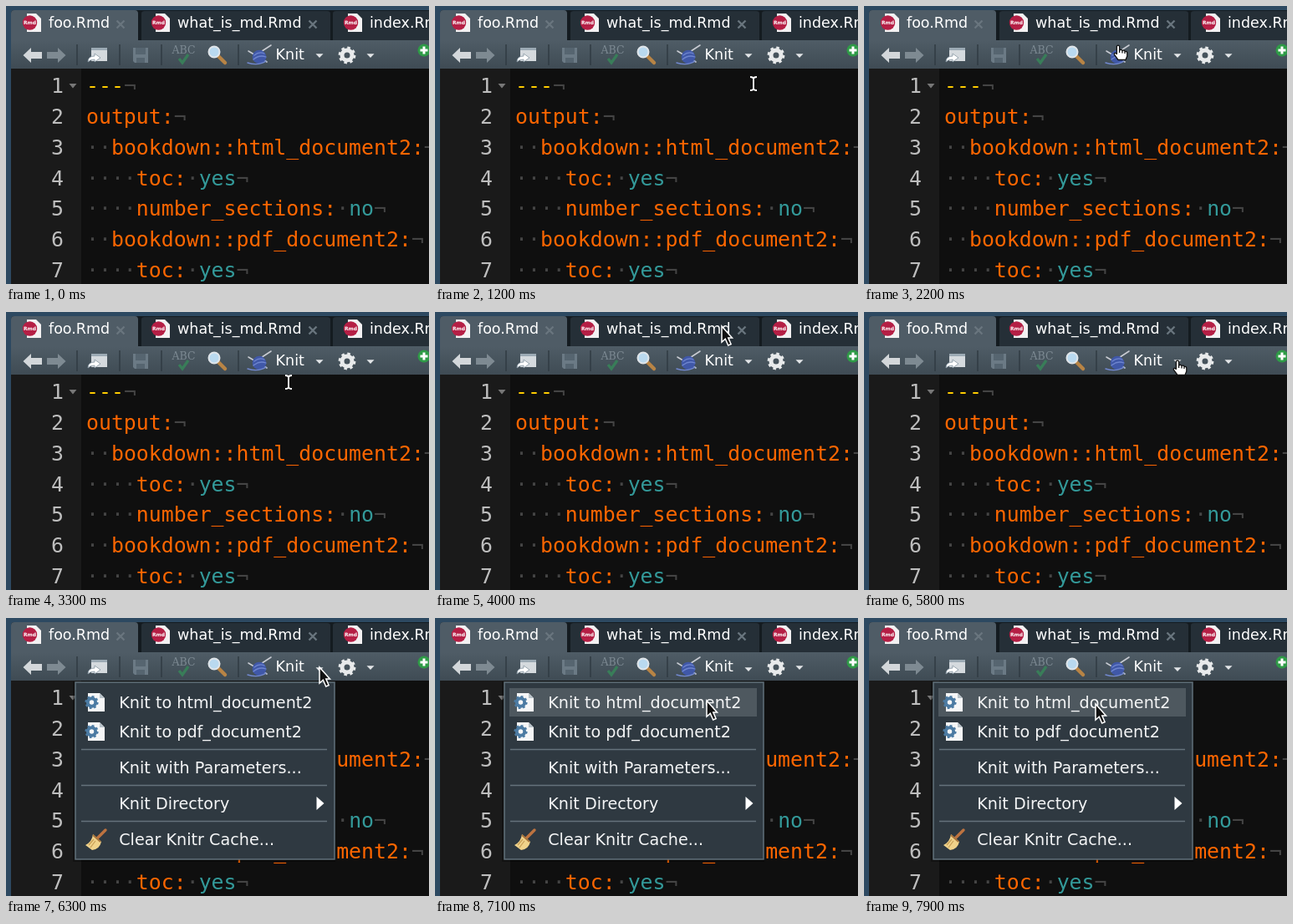
Write an HTML page that moves like this. It is 506 px wide and 333 px high and loops after 8000 ms.

```html
<!DOCTYPE html>
<html lang="en">
<head>
<meta charset="utf-8">
<title>Knit menu</title>
<style>
  html, body { margin: 0; width: 100%; height: 100%; overflow: hidden; background: #0f0f0f; }
  svg { display: block; width: 506px; height: 333px; }
  text { white-space: pre; }
  .ui { font: 17.5px "DejaVu Sans", sans-serif; fill: #fff; }
  .menu { font: 19.2px "DejaVu Sans", sans-serif; fill: #f4f5f6; }
  .code { font: 24.85px "DejaVu Sans Mono", monospace; }
  .key { fill: #f60; }
  .value { fill: #399; }
  .rule { fill: #fc0; }
  .dim { fill: #444; }
  .number { fill: #bebebe; text-anchor: end; }
</style>
</head>
<body>
<svg viewBox="0 0 506 333">
  <defs>
    <linearGradient id="bar" x2="0" y2="1">
      <stop stop-color="#4f5c66"/><stop offset="1" stop-color="#3f4b54"/>
    </linearGradient>
    <g id="file">
      <path d="M-6-11H5L11-5V11H-6Z" fill="#f3f1f2"/>
      <circle cx="-2.500" r="8.700" fill="#b51f45"/>
      <text x="-2.500" y="2.200" text-anchor="middle" font-family="DejaVu Sans, sans-serif" font-weight="bold" font-size="6" fill="#fff">Rmd</text>
    </g>
    <path id="close" d="M-4.500-4.500 4.500 4.500M4.500-4.500-4.500 4.500" stroke="#69757e" stroke-width="2.4"/>
    <path id="back" d="M-11.500 0-2-9V-4H11V4H-2V9Z"/>
    <path id="caret" d="M-4.500-2.300H4.500L0 2.500Z" fill="#e2e5e7"/>
    <g id="gear">
      <circle r="6" fill="none" stroke-width="5"/>
      <circle r="8.700" fill="none" stroke-width="3.400" stroke-dasharray="3.400 3.433"/>
    </g>
    <g id="page">
      <path d="M-8-11H6L12-5V11H-8Z" fill="#f5f6f7"/>
      <path d="M6-11V-5H12Z" fill="#b9c3ca"/>
      <use href="#gear" transform="translate(-3.500 0) scale(.78)" stroke="#4c7ba3"/>
    </g>
    <path id="arrow" d="M0 .9V20L4.300 16.200 7.700 24 11.100 22.500 7.800 14.900H12.500Z" fill="#111" stroke="#fff" stroke-width="1.5"/>
    <g id="beam" fill="none">
      <path id="beamLine" d="M-4-8Q0-8 0-5.500Q0-8 4-8M0-6V6M-4 8Q0 8 0 5.500Q0 8 4 8" stroke-width="1.8" stroke="#fff"/>
    </g>
    <g id="hand" stroke="#111" stroke-width="1.3" stroke-linejoin="round">
      <path d="M-1.600 9V1.200Q0-1 1.600 1.200V6Q4 4.600 5 6.400Q7.300 5.400 8 7.400Q10.800 6.800 10.800 9.400V13L9 17.500H0L-4.800 10.800Q-4.600 8-1.600 10.400Z" fill="#fff"/>
      <path d="M5 6.600V9.500M8 7.600V10M1.600 6V9" fill="none"/>
    </g>
  </defs>

  <rect width="506" height="333" fill="#2d4961"/>
  <path d="M6 333V9Q6 5 10 5H506V333Z" fill="#141b20"/>
  <path d="M6 43V9Q6 5 10 5H154Q158 5 158 9V43Z" fill="#4f5c66"/>
  <path d="M162 41V9Q162 6 166 6H384Q388 6 388 9V41ZM391 41V9Q391 6 395 6H506V41Z" fill="#252f37"/>
  <rect x="6" y="41" width="500" height="34" fill="url(#bar)"/>
  <g id="tabs"></g>

  <use href="#back" x="32" y="59" fill="#d3d7da"/>
  <use href="#back" transform="translate(60 59) scale(-1 1)" fill="#7e8a92"/>
  <path d="M85 46V71M136 46V71M186 46V71M278 46V71" stroke="#303b43" stroke-width="1.5"/>
  <g>
    <rect x="102" y="50" width="19" height="16" fill="#d5dade"/>
    <path d="M102 50H121V53H102Z" fill="#9caab4"/>
    <path d="M98 67Q98 60 106 60V57L113 62 106 67V64Q101 64 98 67Z" fill="#fff" stroke="#8797a2" stroke-width=".8"/>
  </g>
  <g fill="#6b7a85">
    <path d="M152 50H170V68H154L152 66Z"/>
    <path d="M155 50H167V58H155ZM156 62H166V68H156Z" fill="#566570"/>
  </g>
  <text x="198.500" y="57" font-family="DejaVu Serif, Liberation Serif, serif" font-size="12.500" fill="#7c8992">ABC</text>
  <path d="M207 63 211 68 218 58" fill="none" stroke="#397d59" stroke-width="3.4"/>
  <path d="M254 60 262 68" stroke="#b88445" stroke-width="4.5" stroke-linecap="round"/>
  <circle cx="249" cy="55" r="6.500" fill="#b9d9ef" stroke="#e1e6ea" stroke-width="2"/>
  <g fill="none" stroke-linecap="round">
    <path d="M297 60 317 47M290 54 312 67" stroke="#c9ccd3" stroke-width="1.6"/>
    <circle cx="303" cy="61" r="8.300" fill="#4058a8"/>
    <path d="M297 59Q303 54 309 57M296 64Q303 58 311 61" stroke="#6f86cf" stroke-width="1.3"/>
    <path d="M311 66Q302 72 289 68" stroke="#7289d0" stroke-width="1.4"/>
  </g>
  <text class="ui" x="322.600" y="64">Knit</text>
  <use id="knitCaret" href="#caret" x="375" y="59.5"/>
  <use href="#gear" x="408" y="59" stroke="#e8eaeb"/>
  <use href="#caret" x="436" y="59.5"/>
  <circle cx="500" cy="53" r="7.500" fill="#2f9b47"/>
  <path d="M495.500 53H504.500M500 48.500V57.500" stroke="#fff" stroke-width="3"/>

  <rect x="6" y="75" width="84" height="258" fill="#1a1a1a"/>
  <rect x="90" y="75" width="416" height="258" fill="#0f0f0f"/>
  <g id="editor" class="code"></g>
  <path d="M75.500 93H84.500L80 98.500Z" fill="#777"/>

  <g id="menu">
    <rect x="80" y="76" width="314" height="216" fill="#000" opacity=".3"/>
    <rect x="83" y="77" width="310" height="212" fill="#2f3941" stroke="#62717b" stroke-width="1.5"/>
    <rect id="highlight" x="89" y="84" width="296" height="34" fill="#4e585f"/>
    <path d="M90 157.500H384M90 200.500H384M90 243.500H384" stroke="#65727b" stroke-width="1.6"/>
    <g id="items"></g>
    <use href="#page" x="106" y="101"/>
    <use href="#page" x="106" y="136"/>
    <path d="M371.500 214V230L380.500 222Z" fill="#fff"/>
    <path d="M109 264 119 254" stroke="#bd7340" stroke-width="3.4" stroke-linecap="round"/>
    <path d="M104 259 114 268Q112 277 103 278L95 272Q103 268 104 259Z" fill="#f0d28a"/>
    <path d="M104 260 113 268" stroke="#a8743c" stroke-width="2"/>
    <path d="M107 267 101 275M105 265 99 272" stroke="#c79d55" stroke-width="1.2"/>
  </g>
  <use id="cursor"/>
</svg>

<script>
const $ = id => document.getElementById(id);
const LOOP = 8000, STEP = 100, MENU_OPENS = 6300;

const tabs = [[51, 'foo.Rmd', 137], [205, 'what_is_md.Rmd', 367], [435, 'index.Rmd', 530]];
const lines = ['---', 'output:', '··bookdown::html_document2:', '····toc:·yes',
  '····number_sections:·no', '··bookdown::pdf_document2:', '····toc:·yes'];
const items = [[108, 'Knit to html_document2'], [143, 'Knit to pdf_document2'],
  [186, 'Knit with Parameters...'], [229, 'Knit Directory'], [272, 'Clear Knitr Cache...']];

const span = (kind, text) => text ? `<tspan class="${kind}">${text}</tspan>` : '';

function codeLine(line, i) {
  const [, indent, key, gap, value] = /^(·*)([^·]+)(·?)(.*)$/.exec(line);
  const y = 104.3 + i * 36.75;
  return `<text class="number" x="69" y="${y}">${i + 1}</text><text x="96" y="${y}">` +
    span('dim', indent) + span(i ? 'key' : 'rule', key) + span('dim', gap) +
    span('value', value) + span('dim', '¬') + '</text>';
}

$('tabs').innerHTML = tabs.map(([x, name, closeX]) =>
  `<use href="#file" x="${x - 20}" y="20"/><text class="ui" x="${x}" y="26">${name}</text>` +
  `<use href="#close" x="${closeX}" y="22"/>`).join('');
$('editor').innerHTML = lines.map(codeLine).join('');
$('items').innerHTML = items.map(([y, label]) =>
  `<text class="menu" x="135.200" y="${y}">${label}</text>`).join('');

// Pointer strokes as [time, x, y]; the pointer rests between strokes.
const strokes = [
  [[500, 500, 255], [800, 455, 185], [1100, 392, 105], [1300, 372, 87], [1500, 343, 82],
   [1800, 284, 66], [2000, 283, 53], [2200, 304, 47], [2300, 327, 47], [2400, 346, 37]],
  [[2700, 346, 37], [2900, 376, 44], [3000, 387, 56], [3300, 338, 84], [3500, 302, 72],
   [3700, 287, 48], [4000, 343, 16], [4300, 391, 39], [4500, 391, 61], [4700, 368, 73],
   [4900, 322, 70], [5100, 297, 50], [5400, 355, 29], [5600, 382, 45], [5800, 375, 58]],
  [[6700, 375, 58], [6900, 366, 74], [7100, 325, 98], [7300, 250, 110], [7500, 194, 110],
   [7600, 187, 107], [7700, 206, 106], [7900, 277, 102]]
];

// Cubic Hermite curve through the points of a stroke.
function along(points, t) {
  const last = points.length - 1;
  if (t >= points[last][0]) return points[last].slice(1);
  const i = points.findIndex(p => p[0] > t) - 1;
  const a = points[i], b = points[i + 1];
  const before = points[Math.max(i - 1, 0)], after = points[Math.min(i + 2, last)];
  const span = b[0] - a[0], u = (t - a[0]) / span;
  return [1, 2].map(k => {
    const inSlope = (b[k] - before[k]) / (b[0] - before[0]) * span;
    const outSlope = (after[k] - a[k]) / (after[0] - a[0]) * span;
    const d = b[k] - a[k];
    return a[k] + u * (inSlope + u * (3 * d - 2 * inSlope - outSlope + u * (inSlope + outSlope - 2 * d)));
  });
}

function cursorKind(x, y, menuOpen) {
  if (menuOpen) return 'arrow';
  if (y > 75) return 'beam';
  return x > 289 && x < 383 && y > 45 && y < 71 ? 'hand' : 'arrow';
}

function draw(time) {
  const t = Math.floor(time % LOOP / STEP) * STEP;
  const menuOpen = t >= MENU_OPENS;
  const stroke = strokes.filter(s => s[0][0] <= t).pop();
  $('menu').style.display = menuOpen ? '' : 'none';
  $('knitCaret').setAttribute('y', menuOpen ? 61.5 : 59.5);
  $('cursor').style.display = stroke ? '' : 'none';
  if (!stroke) return;
  const [x, y] = along(stroke, t).map(Math.round);
  $('cursor').setAttribute('href', '#' + cursorKind(x, y, menuOpen));
  $('cursor').setAttribute('transform', `translate(${x} ${y})`);
  $('highlight').style.display = y >= 84 && y < 118 ? '' : 'none';
}

let start;
function tick(now) {
  start ??= now;
  draw(now - start);
  requestAnimationFrame(tick);
}
draw(0);
requestAnimationFrame(tick);
</script>
</body>
</html>
```
